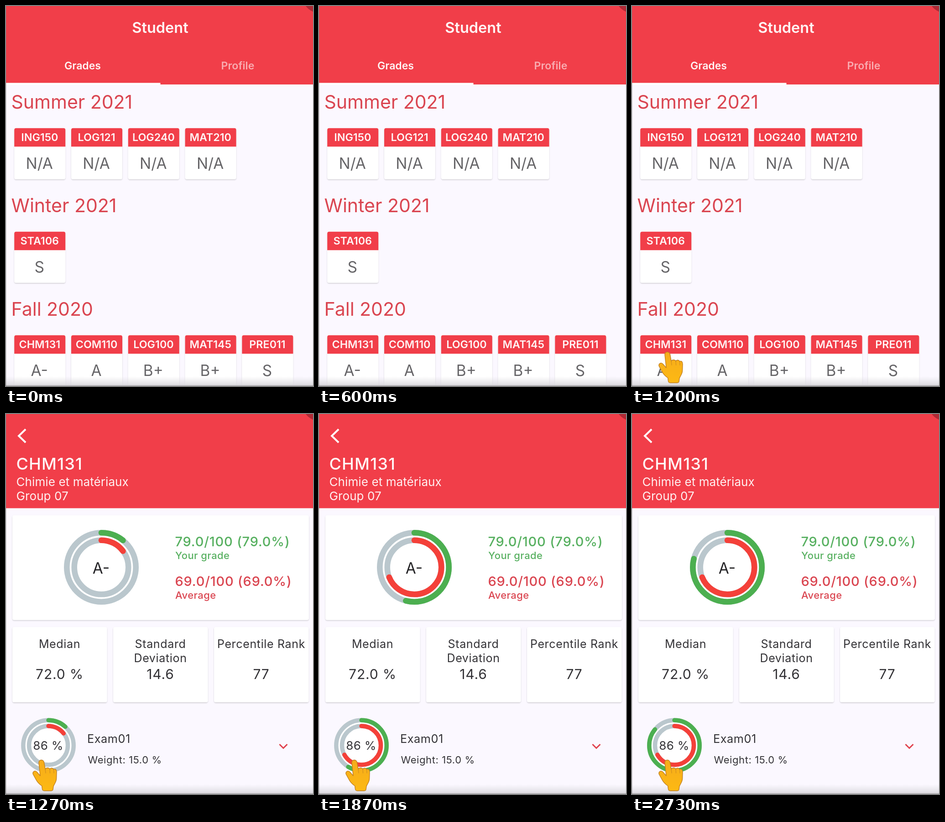
Write an HTML page that moves like this. It is 673x833 px and loops after 3540 ms.

```html
<!DOCTYPE html>
<html lang="en">
<head>
<meta charset="utf-8">
<title>Student grades</title>
<style>
  html, body { margin: 0; width: 100%; height: 100%; overflow: hidden; background: #fbf8ff; }
  svg { display: block; width: 100vw; height: 100vh; }
  text { font-family: Inter, Roboto, sans-serif; font-optical-sizing: none; white-space: pre; }
</style>
</head>
<body>
<svg id="stage" viewBox="0 0 673 833">
  <defs>
    <linearGradient id="fade" x1="0" y1="0" x2="0" y2="1">
      <stop offset="0" stop-color="#dcdadf" stop-opacity="0"/>
      <stop offset="1" stop-color="#d6d4d9" stop-opacity=".85"/>
    </linearGradient>
    <linearGradient id="skin" x1="0" y1="0" x2="0" y2="1">
      <stop offset="0" stop-color="#f6ac1b"/>
      <stop offset="1" stop-color="#fdb913"/>
    </linearGradient>
    <filter id="shadow" x="-10%" y="-10%" width="120%" height="125%">
      <feDropShadow dx="0" dy="1.4" stdDeviation="1.1" flood-color="#000" flood-opacity=".2"/>
    </filter>
  </defs>
  <rect width="673" height="833" fill="#fbf8ff"/>
  <g id="grades"></g>
  <g id="detail"></g>
  <path d="M657 0Q663 8 673 12.500V0Z" fill="#b02a35"/>
  <rect y="812" width="673" height="20" fill="url(#fade)"/>
  <rect y="831.5" width="673" height="1.5" fill="#a9a7ab"/>
  <rect width="1" height="833" fill="#8a8088" opacity=".3"/>
  <g id="hand" stroke="#c07f22" stroke-width="1.4" stroke-linejoin="round" stroke-linecap="round">
    <path fill="url(#skin)" d="M72 765C71 757 82 756 83.500 764L86 778C89 775 94 775 96 778C99 775 103 776 104.500 779C108 777 111 780 111 785L110.500 800C110 807 106 811 104 816L103 823Q102.500 826 99 826H84Q80 826 79.500 822L78.500 815C72 811 68 806 65 800L59.500 790C57 784 64 780 68 785L75 793Z"/>
    <path fill="none" opacity=".6" d="M86 778L87 787M96 778L96.500 787M104.500 779L105 787"/>
  </g>
</svg>
<script>
const LOOP = 3540, FPS = 15;
const HAND_AT = 870, DETAIL_AT = 1260, RINGS_AT = 1117;
const RED = '#f13e49', INK_RED = '#da4550', GREEN = '#4caf50', DARK = '#333236';
const $ = id => document.getElementById(id);

function add(parent, tag, attrs, content = '') {
  const el = document.createElementNS('http://www.w3.org/2000/svg', tag);
  for (const key in attrs) el.setAttribute(key, attrs[key]);
  el.textContent = content;
  return parent.appendChild(el);
}

function label(parent, content, x, y, size, fill, opts = {}) {
  return add(parent, 'text', {
    x, y, fill, 'font-size': size, 'font-weight': opts.weight || 400,
    'letter-spacing': opts.spacing || 0, 'text-anchor': opts.anchor || 'start'
  }, content);
}

function panel(parent, x, y, width, height) {
  add(parent, 'rect', { x, y, width, height, rx: 4, fill: '#fff', filter: 'url(#shadow)' });
}

function header(parent, height) {
  add(parent, 'rect', { width: 673, height, fill: RED });
}

function buildGrades(g) {
  const center = { anchor: 'middle', weight: 600 };
  header(g, 172);
  label(g, 'Student', 338, 59, 32.5, '#fff5f5', center);
  label(g, 'Grades', 168, 139, 23, '#fff5f5', center);
  label(g, 'Profile', 508, 139, 23.2, '#f9abb0', center);
  add(g, 'rect', { y: 168.5, width: 338.5, height: 4, fill: '#fff' });

  const terms = [
    ['Summer 2021', ['ING150 N/A', 'LOG121 N/A', 'LOG240 N/A', 'MAT210 N/A']],
    ['Winter 2021', ['STA106 S']],
    ['Fall 2020', ['CHM131 A-', 'COM110 A', 'LOG100 B+', 'MAT145 B+', 'PRE011 S']]
  ];
  terms.forEach(([term, courses], row) => {
    const y = 267.7 + row * 227;
    label(g, term, 11.5, y - 43, 41, INK_RED);
    courses.forEach((course, col) => {
      const x = 18.2 + col * 124.8, [code, grade] = course.split(' ');
      panel(g, x, y, 112, 112);
      add(g, 'path', { d: `M${x} ${y + 40.5}v-36.500q0-4 4-4h104q4 0 4 4v36.500z`, fill: RED });
      label(g, code, x + 55.6, y + 28.3, 23.3, '#fff5f5', center);
      label(g, grade, x + 55, y + 89.3, 33.4, '#666568', { anchor: 'middle' });
    });
  });
}

// A track with a coloured arc that grows to `percent` in `duration` ms.
function ring(parent, cx, cy, r, width, color, percent, duration) {
  const base = { cx, cy, r, fill: 'none', 'stroke-width': width };
  add(parent, 'circle', { ...base, stroke: '#bac7cd' });
  const arc = add(parent, 'circle', {
    ...base, stroke: color, pathLength: 100, 'stroke-linecap': 'round',
    transform: `rotate(-90 ${cx} ${cy})`
  });
  return time => {
    const part = Math.min(1, Math.max(0, (time - RINGS_AT) / duration));
    arc.setAttribute('stroke-dasharray', `${percent * part} 200`);
  };
}

function ringPair(parent, cx, cy, outer, inner, width, grade, average) {
  add(parent, 'circle', { cx, cy, r: outer, fill: '#fff' });
  return [
    ring(parent, cx, cy, outer, width, GREEN, grade, 1097),
    ring(parent, cx, cy, inner, width, '#f44039', average, 700)
  ];
}

function buildDetail(g) {
  const wide = { spacing: .65, anchor: 'middle' };
  header(g, 206.5);
  add(g, 'path', { d: 'M43 33.500L28 48L43 62.500', fill: 'none', stroke: '#fff', 'stroke-width': 4 });
  label(g, 'CHM131', 22.5, 122, 36, '#fff5f5', { weight: 500, spacing: 1.2 });
  label(g, 'Chimie et matériaux', 22.5, 157.5, 26, '#fff0f0', { spacing: .1 });
  label(g, 'Group 07', 22.5, 188.5, 26, '#fff0f0', { spacing: .1 });

  panel(g, 14, 222, 650, 229.5);
  const big = ringPair(g, 209, 336, 75.7, 59.3, 12.6, 79, 69);
  label(g, 'A-', 208.5, 350, 33.4, '#252427', { anchor: 'middle' });

  const summary = [
    ['79.0/100 (79.0%)', 'Your grade', 290, '#57b060'],
    ['69.0/100 (69.0%)', 'Average', 377, INK_RED]
  ];
  for (const [score, name, y, color] of summary) {
    label(g, score, 370.5, y, 29, color, { weight: 500, spacing: .8 });
    label(g, name, 371, y + 28, 22, color, { weight: 500, spacing: .4 });
  }

  const stats = [
    [['Median'], '72.0 %'],
    [['Standard', 'Deviation'], '14.6'],
    [['Percentile Rank'], '77']
  ];
  stats.forEach(([lines, value], i) => {
    const x = 14 + i * 221, middle = x + 103.5;
    panel(g, x, 467, 207.5, 165);
    lines.forEach((line, n) => label(g, line, middle, 512.5 + n * 31, 25, DARK, wide));
    label(g, value, middle, 581, 30, DARK, { spacing: .8, anchor: 'middle' });
  });

  const small = ringPair(g, 93, 726.5, 55.2, 42.5, 9.4, 86, 67);
  label(g, '86 %', 92.5, 736, 26, DARK, { spacing: .3, anchor: 'middle' });
  label(g, 'Exam01', 178, 721, 25.2, DARK, { spacing: .6 });
  label(g, 'Weight: 15.0 %', 179.5, 766, 22, DARK, { spacing: .6 });
  add(g, 'path', { d: 'M599.500 724L608 732.500L616.500 724', fill: 'none', stroke: '#e0414d', 'stroke-width': 3 });
  return [...big, ...small];
}

buildGrades($('grades'));
const rings = buildDetail($('detail'));
const show = (id, on) => $(id).setAttribute('visibility', on ? 'visible' : 'hidden');

function draw(ms) {
  const time = Math.floor((ms + 5) * FPS / 1000) * 1000 / FPS;
  show('grades', time < DETAIL_AT);
  show('detail', time >= DETAIL_AT);
  show('hand', time >= HAND_AT - 5);
  rings.forEach(update => update(time));
}

const start = performance.now();
function tick() {
  draw((performance.now() - start) % LOOP);
  requestAnimationFrame(tick);
}
draw(0);
requestAnimationFrame(tick);
</script>
</body>
</html>
```
